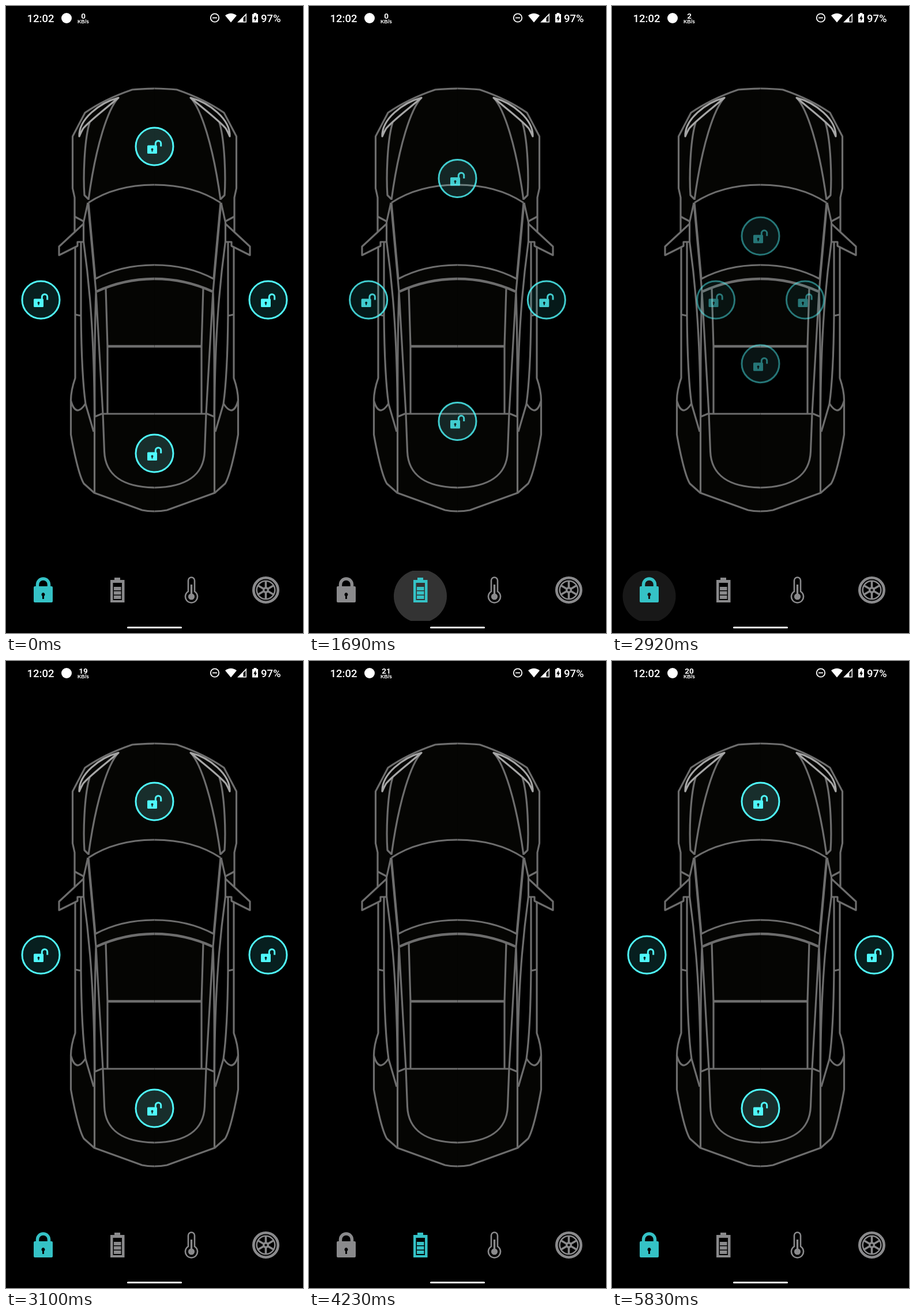
Recreate the animation shown at these times as an HTML page. Size 515 px wide and 1087 px high, loop 6490 ms.

```html
<!DOCTYPE html>
<html lang="en">
<head>
<meta charset="utf-8">
<title>Car lock</title>
<style>
  html, body { margin: 0; width: 100%; height: 100%; overflow: hidden; background: #000; }
  svg { display: block; width: 100%; height: 100%; }
  .car { fill: none; stroke: #6d6d6d; stroke-width: 3.2; stroke-linejoin: round; }
  .lamp { stroke: #a6a6a6; }
  .thick { stroke-width: 4.4; }
  .panel { fill: #050503; stroke: none; }
  .bar { fill: #fff; font: 500 18.5px Roboto, sans-serif; }
  .rate { font: 700 13.5px Roboto, sans-serif; text-anchor: middle; }
  .unit { font: 700 8.8px "Liberation Sans", sans-serif; text-anchor: middle; }
  .line { fill: none; stroke: currentColor; }
  .nav { color: #8a8a8c; fill: currentColor; }
  .nav.on { color: #35c2c6; }
</style>
</head>
<body>
<svg viewBox="0 0 515 1087" preserveAspectRatio="none">
  <defs>
    <clipPath id="navClip"><rect y="979" width="515" height="87"/></clipPath>
    <g id="half">
      <!-- body panels: hood, roof, tail -->
      <path class="panel" d="M257.500 143L219 145Q172 161 137 185L115.500 226V316L119 332V391L134 373L143 341Q190 310 257.500 310ZM155 473Q200 449 257.500 449V590H176L168 707L156 495ZM257.500 707H166L153 712V738L138 690Q131 700 125 701L112.500 686V743C118 775 127 815 135 828L153 844L236 874L257.500 876Z"/>
      <!-- outline -->
      <path d="M257.500 143Q236 143.500 219 145Q172 161 137 185L115.500 226V316L119 332V391M120 417V645Q112 668 112.500 686V743C118 775 127 815 135 828L153 844L236 874Q246 876 257.500 876"/>
      <!-- hood -->
      <path d="M195 159C177 178 156 240 143 336M145 202C135 235 134 300 136 328L143 335"/>
      <path class="lamp" d="M195 159C162 168 126 196 127 226Q131 217 134 212C147 197 174 177 195 159Z"/>
      <!-- mirror and doors -->
      <path d="M119 365L134 373M142 341L134.500 375V408M134 378L92 417V432L124 416V409H134M130 409V537L120.500 535M130 537Q131 640 138 690L152 738"/>
      <path d="M112.500 684Q117 701 125 701Q131 700 138 689"/>
      <path d="M134.500 408C143 470 153 560 153.500 712V845"/>
      <!-- windows and roof -->
      <path d="M143 341Q190 310 257.500 310M143 341L155 473Q200 449 257.500 449M142 341L156 495L168 707M156 495Q153 590 154 712L166 707H257.500"/>
      <path class="thick" d="M157 495Q205 473 257.500 473M176 590H257.500"/>
      <path d="M173 489L176 590V707M168 707L170.500 772C172 815 205 834 257.500 835"/>
    </g>
    <g id="unlock" fill="#4ff8fb">
      <circle r="32.500" fill="none" stroke="#4ff8fb" stroke-width="3"/>
      <path fill-rule="evenodd" d="M-11-2H3Q4.500-2 4.500-.5V11Q4.500 12.500 3 12.500H-11Q-12.500 12.500-12.500 11V-.5Q-12.500-2-11-2ZM-4 3A2 2 0 0 0-5 6.700V9H-3V6.700A2 2 0 0 0-4 3Z"/>
      <path d="M1.800-1V-5a4.700 4.700 0 0 1 9.400 0V0" fill="none" stroke="#4ff8fb" stroke-width="3"/>
    </g>
  </defs>
  <rect width="515" height="1087"/>

  <g class="car"><use href="#half"/><use href="#half" transform="matrix(-1 0 0 1 515 0)"/></g>
  <g id="locks"></g>

  <g clip-path="url(#navClip)"><circle id="ripple" cy="1023" r="46" fill="#fff"/></g>
  <g class="nav">
    <path fill-rule="evenodd" d="M50 1006H79Q81 1006 81 1008V1032Q81 1034 79 1034H50Q48 1034 48 1032V1008Q48 1006 50 1006ZM64.500 1017A3.300 3.300 0 0 0 63 1023V1028H66V1023A3.300 3.300 0 0 0 64.500 1017Z"/>
    <path class="line" stroke-width="5.500" d="M54.500 1007V1003a10 10 0 0 1 20 0V1007"/>
  </g>
  <g class="nav">
    <path fill-rule="evenodd" d="M188 991H198V995H205.500V1034H181V995H188ZM185.500 1000V1030H201V1000Z"/>
    <path d="M187 1007H199.500V1013H187ZM187 1014.500H199.500V1020.500H187ZM187 1022H199.500V1028H187Z"/>
  </g>
  <g class="nav">
    <path class="line" stroke-width="2.600" d="M316 1015V996a5.500 5.500 0 0 1 11 0V1015a10.500 10.500 0 1 1-11 0Z"/>
    <path class="line" stroke-width="3.400" d="M321.500 1003V1024"/>
    <circle cx="321.500" cy="1024" r="5.600"/>
  </g>
  <g class="nav line" transform="translate(450.500 1012.500)">
    <circle class="line" r="21.200" stroke-width="4.600"/>
    <circle class="line" r="15.800" stroke-width="2.600"/>
    <path id="spoke" class="line" stroke-width="3.600" d="M0-16V-4M0 4V16"/>
    <use href="#spoke" transform="rotate(60)"/>
    <use href="#spoke" transform="rotate(120)"/>
    <circle class="line" r="3.800" stroke-width="3.400"/>
  </g>

  <g class="bar">
    <text x="36.500" y="27.500">12:02</text>
    <circle cx="105" cy="21" r="9"/>
    <text id="rate" class="rate" x="134" y="22"></text>
    <text class="unit" x="134" y="30">KB/s</text>
    <circle cx="362" cy="20.500" r="7.200" fill="none" stroke="#fff" stroke-width="1.800"/>
    <path d="M358 19.600H366V21.400H358Z"/>
    <path d="M380 16.500Q390 9 400 16.500L390 28.500Z"/>
    <path d="M417 12.500V28.500H401ZM415.500 16.500L411.500 20.500V27H415.500Z" fill-rule="evenodd"/>
    <path d="M429.500 12H434.500V14H437V28.500H427V14H429.500ZM433 16L429 22.500H431.500V27L435 20.500H433Z" fill-rule="evenodd"/>
    <text x="442" y="27.500">97%</text>
    <rect x="210" y="1076" width="95" height="3" rx="1.500"/>
  </g>
</svg>
<script>
const LOOP = 6490, STEP = 94, MOVE = 300;
// tap start, delay until the locks move, last step, ripple strength
const taps = [
  { at: 1510, delay: 123, last: 5, glow: .22, open: false },
  { at: 2630, delay: 164, last: 5, glow: .22, open: true },
  { at: 3760, delay: 110, last: 5, glow: .20, open: false },
  { at: 4800, delay: 129, last: 4, glow: .16, open: true }
];
const rates = [[0, 0], [1880, 2], [3010, 19], [4140, 21], [5830, 20]];
const $ = id => document.getElementById(id);
const clamp = v => Math.max(0, Math.min(1, v));
const lastBefore = (list, time, key) => list.filter(e => e[key] <= time).pop();
const navs = document.querySelectorAll('.nav');

const locks = [[0, -1], [0, 1], [-1, 0], [1, 0]].map(([dx, dy]) => {
  const g = document.createElementNS('http://www.w3.org/2000/svg', 'g');
  const fill = dx ? 'rgba(50,220,215,.14)' : 'rgba(110,230,230,.18)';
  g.innerHTML = `<circle r="32.5" fill="${fill}"/><use href="#unlock"/>`;
  $('locks').append(g);
  return { g, dx, dy };
});

function draw(t) {
  let out = 1, open = true, glow = 0;
  const tap = lastBefore(taps, t, 'at');
  if (tap) {
    const step = Math.min(Math.floor((t - tap.at + 8) / STEP), tap.last);
    const age = step * STEP, since = age - tap.delay;
    const p = step === tap.last ? 1 : clamp(since / MOVE);
    out = tap.open ? p : 1 - p;
    open = since >= 0 ? tap.open : !tap.open;
    glow = since < 0
      ? tap.glow * clamp((age + 60) / 200)
      : Math.min(tap.glow, Math.max(0, .33 - .6 * p));
    $('ripple').setAttribute('cx', tap.open ? 64.5 : 193);
  }
  $('ripple').setAttribute('opacity', glow);
  // the upper and lower locks stop 10px short of the centre
  for (const { g, dx, dy } of locks) {
    const x = 257.5 + dx * 197 * out, y = 509.5 + dy * (10 + 256 * out);
    g.setAttribute('transform', `translate(${x} ${y})`);
    g.setAttribute('opacity', out ** .8);
  }
  navs.forEach((n, i) => n.classList.toggle('on', i === (open ? 0 : 1)));
  $('rate').textContent = lastBefore(rates, t, 0)[1];
}

const start = performance.now();
function tick() {
  draw((performance.now() - start) % LOOP);
  requestAnimationFrame(tick);
}
tick();
</script>
</body>
</html>
```
